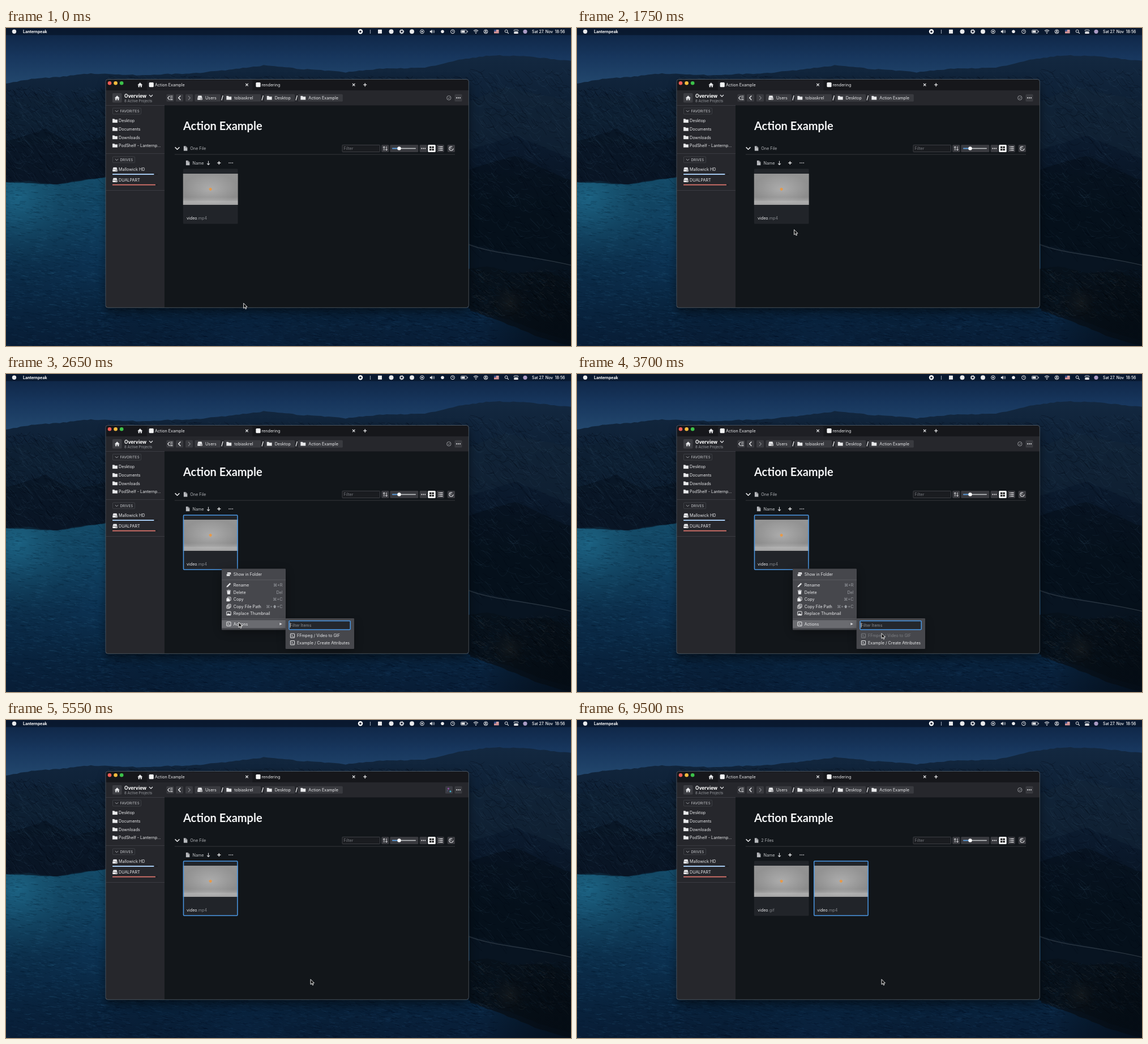
An HTML page with a canvas for the animation above (9550 ms loop, 998 px wide and 561 px high).

```html
<!DOCTYPE html>
<html lang="en">
<head>
<meta charset="utf-8">
<title>File action demo</title>
<style>
html, body { margin: 0; width: 100%; height: 100%; overflow: hidden; background: #0a1a30; }
canvas, svg { position: absolute; left: 0; top: 0; width: 998px; height: 561px; }
text { font-family: Inter, "DejaVu Sans", sans-serif; white-space: pre; }
</style>
</head>
<body>
<canvas id="wall" width="998" height="561"></canvas>
<svg id="ui" viewBox="0 0 998 561"></svg>
<script>
const LOOP = 9550;

// ---------- wallpaper ----------
const g = document.getElementById('wall').getContext('2d');
let seed = 7;
const rnd = () => (seed = seed * 16807 % 2147483647) / 2147483647;

function ramp(y0, y1, ...colors) {
  const grad = g.createLinearGradient(0, y0, 0, y1);
  colors.forEach((c, i) => grad.addColorStop(i / (colors.length - 1), c));
  return grad;
}
function land(points, fill) {
  g.beginPath();
  points.forEach(([x, y], i) => {
    if (!i) return g.moveTo(x, y);
    const [px, py] = points[i - 1];
    const n = Math.max(1, Math.abs(x - px) / 6 | 0);
    for (let k = 1; k <= n; k++)
      g.lineTo(px + (x - px) * k / n, py + (y - py) * k / n + (rnd() - .5) * 1.6);
  });
  g.fillStyle = fill;
  g.fill();
}
// short random strokes inside a box
function grain(n, x, y, w, h, len, slope, colors, width = 1) {
  g.lineWidth = width;
  for (let i = 0; i < n; i++) {
    const a = x + rnd() * w, b = y + rnd() * h, l = len * (.4 + rnd());
    g.strokeStyle = colors[i % colors.length];
    g.beginPath();
    g.moveTo(a, b);
    g.quadraticCurveTo(a + l / 2, b + slope * l * rnd(), a + l, b + slope * l * (rnd() * 1.4 - .2));
    g.stroke();
  }
}
function glow(x, y, r, color) {
  const grad = g.createRadialGradient(x, y, 0, x, y, r);
  grad.addColorStop(0, color);
  grad.addColorStop(1, 'transparent');
  g.fillStyle = grad;
  g.fillRect(x - r, y - r, 2 * r, 2 * r);
}
function paintWall() {
  g.fillStyle = ramp(0, 100, '#0d2342', '#17365d', '#23486e');
  g.fillRect(0, 0, 998, 110);
  g.fillStyle = ramp(262, 561, '#155070', '#114567', '#0c3252', '#092540', '#081d36');
  g.fillRect(0, 250, 998, 311);
  glow(20, 300, 170, 'rgba(38,126,158,.45)');
  grain(1500, -10, 275, 190, 286, 9, .25, ['rgba(70,150,185,.10)', 'rgba(2,18,40,.22)']);
  grain(1500, 160, 490, 700, 71, 9, .3, ['rgba(50,105,150,.13)', 'rgba(1,10,26,.28)']);

  const shore = [[998, 561], [940, 545], [880, 520], [820, 498], [817, 265],
    [176, 263], [130, 268], [90, 276], [40, 270], [0, 272]];
  land([[0, 98], [45, 90], [95, 86], [150, 80], [230, 83], [330, 80], [400, 73], [455, 66],
    [520, 72], [600, 78], [660, 72], [740, 70], [800, 56], [860, 48], [920, 50], [998, 58], ...shore],
    ramp(50, 330, '#132840', '#0d1f34', '#0a182a', '#081421'));
  land([[0, 130], [60, 116], [110, 128], [176, 108], [176, 263], [90, 276], [0, 272]], 'rgba(14,32,50,.6)');
  land([[0, 200], [70, 178], [120, 205], [176, 190], [176, 263], [90, 276], [0, 272]], 'rgba(5,15,27,.45)');
  land([[817, 130], [880, 105], [998, 128], [998, 230], [900, 190], [817, 215]], 'rgba(21,38,56,.5)');
  land([[817, 250], [900, 225], [998, 270], [998, 420], [817, 380]], 'rgba(4,12,22,.45)');
  const rock = ['rgba(80,115,145,.10)', 'rgba(1,7,15,.28)'];
  grain(650, -10, 104, 185, 155, 14, 1.3, rock);
  grain(650, 815, 70, 190, 320, 16, 1.2, rock);
  grain(250, 176, 84, 640, 12, 10, .8, rock);

  // road, cliffs and dark bay
  g.strokeStyle = '#27333f';
  g.lineWidth = 1.6;
  g.beginPath();
  g.moveTo(815, 381);
  g.bezierCurveTo(860, 399, 920, 400, 1000, 419);
  g.stroke();
  land([[817, 425], [850, 420], [900, 432], [960, 430], [998, 445], [998, 552], [940, 535], [890, 515], [817, 495]], '#07111b');
  grain(500, 820, 425, 180, 85, 9, 1, ['rgba(120,125,125,.13)', 'rgba(0,4,9,.4)', 'rgba(30,70,100,.16)']);
  glow(890, 485, 40, 'rgba(70,62,50,.22)');
  glow(998, 561, 160, 'rgba(3,10,18,.65)');
  glow(420, 561, 260, 'rgba(12,45,80,.25)');
  g.fillStyle = 'rgba(8,20,40,.72)';
  g.fillRect(0, 0, 998, 12.5);
}
paintWall();

// ---------- SVG helpers ----------
const BTN = '#393a3f', INK = '#e9eaec', DIM = '#9b9ea3', BLUE = '#4a97e3';
const R = (x, y, w, h, fill, r = 0, more = '') =>
  `<rect x="${x}" y="${y}" width="${w}" height="${h}" rx="${r}" fill="${fill}" ${more}/>`;
const C = (x, y, r, fill, more = '') => `<circle cx="${x}" cy="${y}" r="${r}" fill="${fill}" ${more}/>`;
const P = (d, stroke = INK, w = 1.2, fill = 'none') =>
  `<path d="${d}" fill="${fill}" stroke="${stroke}" stroke-width="${w}" stroke-linejoin="round"/>`;
const T = (x, y, s, size = 7.2, fill = INK, weight = 400, more = '') =>
  `<text x="${x}" y="${y}" font-size="${size}" fill="${fill}" font-weight="${weight}" ${more}>${s}</text>`;
const U = (id, x, y) => `<use href="#${id}" x="${x}" y="${y}"/>`;
const G = (id, body, more = '') => `<g id="${id}" ${more}>${body}</g>`;
const box = (x, y, w, h) => R(x, y, w, h, 'none', 1, 'stroke="#45474c" stroke-width=".8"');
const dots = (x, y, c = INK) => [-3, 0, 3].map(d => C(x + d, y, 1, c)).join('');

// icons are centred on 0,0
const defs = `<defs>
  <linearGradient id="backdrop" x2="0" y2="1">
    <stop offset="0" stop-color="#a3a3a3"/><stop offset=".75" stop-color="#999"/>
    <stop offset=".84" stop-color="#aaa"/><stop offset=".9" stop-color="#c2c2c2"/><stop offset="1" stop-color="#b4b4b4"/>
  </linearGradient>
  <radialGradient id="light"><stop offset="0" stop-color="#fff" stop-opacity=".16"/>
    <stop offset="1" stop-color="#444" stop-opacity=".16"/></radialGradient>
  <filter id="soft" x="-20%" y="-20%" width="140%" height="150%"><feGaussianBlur stdDeviation="9"/></filter>
  ${G('folder', P('M-4.3-3.2h3.2l1 1.2h4.4v5.2h-8.6z', INK, .3, INK))}
  ${G('drive', P('M-2.8-3.6h5.6l1.2 3.4h-8z', INK, .3, INK) + R(-4.3, .4, 8.6, 3.2, INK, .8) + R(1.2, 1.6, 2, .9, '#333'))}
  ${G('doc', P('M-3-4h3.6l2.6 2.6v5.4h-6.2z', '#b9bbbf', .3, '#b9bbbf') + P('M.5-4v2.7h2.7', '#4a4c50', .6))}
  ${G('home', P('M-4.2.3L0-3.8 4.2.3H3V4H1V1.2h-2V4h-2V.3z', INK, .3, INK))}
  ${G('down', P('M-3-1.4L0 1.6 3-1.4', INK, 1.2))}
  ${G('small', P('M-2.6-1.2L0 1.4 2.6-1.2', '#b5b7bb', .9))}
  ${G('cross', P('M-2.2-2.2L2.2 2.2M2.2-2.2L-2.2 2.2', INK, 1.1))}
  ${G('plus', P('M-3 0h6M0-3v6', INK, 1.3))}
  ${G('run', R(-3.6, -3.6, 7.2, 7.2, 'none', .4, 'stroke="currentColor" stroke-width="1"') + P('M-1.8-1.6L.2 0-1.8 1.6M.6 1.8h1.6', 'currentColor', .9))}
</defs>`;

function menuBar() {
  const ring = x => C(x, 6.3, 3.4, 'none', `stroke="${INK}" stroke-width="1"`);
  return C(14.5, 6.3, 3.7, INK) + T(30, 8.9, 'Lanternpeak', 6.9, '#fff', 700) +
    C(626, 6.3, 4.2, '#fff') + R(624.4, 4.7, 3.2, 3.2, '#14243c', .5) +
    P('M643.5 3v7', '#8d98a8', 1.2) + R(657, 2.8, 7, 7, INK, .5) + C(680.5, 6.3, 4, INK) +
    C(699, 6.3, 2.6, 'none', `stroke="${INK}" stroke-width="1.6"`) +
    C(699, 6.3, 3.8, 'none', `stroke="${INK}" stroke-width="1" stroke-dasharray="1.5 1.5"`) +
    C(717, 6.3, 4, INK) + ring(735) + C(735, 6.3, 1.4, INK) +
    P('M749 5h1.6l2-1.8v6.2l-2-1.8H749z', INK, .4, INK) + P('M754 4.6q1.4 1.7 0 3.4M755.6 3.4q2.4 2.9 0 5.8', INK, .8) +
    C(771, 6.3, 2.8, INK) + ring(789) + P('M789 4.2v2.3h1.7', INK, .8) +
    R(803.5, 3.6, 10.5, 5.4, 'none', 1.2, `stroke="${INK}" stroke-width=".8"`) + R(804.5, 4.6, 6, 3.4, INK) + R(814.8, 5.2, 1, 2.2, INK) +
    P('M826 5q4-3.2 8 0M827.6 6.8q2.4-2 4.8 0', INK, 1.1) + C(830, 8.7, 1, INK) +
    ring(847.5) + C(847.5, 5.3, 1.2, INK) + P('M845.5 8.4q2-2.2 4 0', INK, 1.1) +
    R(862, 3, 8.5, 6.4, '#e4dcdc') + [4.2, 6.2, 8.2].map(y => R(862, y, 8.5, .9, '#c4484c')).join('') + R(862, 3, 3.8, 3.2, '#3c548e') +
    C(883.6, 5.6, 2.4, 'none', `stroke="${INK}" stroke-width="1"`) + P('M885.4 7.4l2.4 2.4') +
    R(897.2, 3, 7.6, 2.8, 'none', 1.4, `stroke="${INK}" stroke-width=".9"`) + R(897, 6.8, 8, 3.2, INK, 1.6) +
    C(917, 6.3, 3.6, '#a99bc4') + T(929, 8.9, 'Sat 27. Nov  18:56', 6.9, '#fff', 500);
}

function sidebar() {
  const place = (y, name) => U('folder', 192.5, y) + T(199, y + 2.7, name);
  const drive = (y, name, w, color) => U('drive', 192.5, y) + T(199, y + 2.7, name) +
    R(188, y + 7.5, 80, 1.8, '#1d1e22') + R(188, y + 7.5, w, 1.8, color, .6);
  const head = (y, w, name) => box(188.5, y - 5.3, w, 10.6) + U('small', 195.5, y) +
    T(201.5, y + 2.3, name, 6.1, '#b5b7bb', 500, 'letter-spacing=".15"');
  const rule = y => R(176.5, y, 103.5, 1, '#3a3b41');
  return R(176.5, 110, 103.5, 383, '#26272c') + R(188, 115, 16.5, 16.5, '#3d3e43', 1.5) + U('home', 196.3, 123.3) +
    T(209, 122.6, 'Overview', 8.4, '#fff', 700) + U('down', 256, 119.4) +
    T(209, 130.9, '8 Active Projects', 6.2, DIM) + rule(136) +
    head(146.6, 50, 'FAVORITES') + place(163.7, 'Desktop') + place(178.3, 'Documents') +
    place(192.9, 'Downloads') + place(207.4, 'PodShelf - Lanternp...') + rule(221) +
    head(232.3, 39, 'DRIVES') + drive(249.6, 'Mallowick HD', 73.5, '#a5c9ef') +
    drive(268.3, 'DUALPART', 76, '#df7770') + rule(286);
}

function toolbar() {
  const crumb = (x, w, icon, name) => R(x, 116.8, w, 13, BTN, 1.5) + U(icon, x + 9, 123.2) + T(x + 18.5, 125.9, name);
  const slash = x => P(`M${x} 127.5l2.4-8.5`, INK, 1.3);
  const key = (x, color = BTN) => R(x, 116.8, 13, 13, color, 1.5);
  return R(280, 110, 537, 26.5, '#26272c') + key(283.5) + key(300) + key(317) +
    P('M289 119.8l-3.4 3.5 3.4 3.5M290 120.2h4.5M290 123.3h4.5M290 126.4h4.5', INK, 1.1) +
    P('M308.3 119.6l-3.6 3.7 3.6 3.7', INK, 1.4) + P('M322 119.8l3.4 3.5-3.4 3.5', '#85878b', 1.1) +
    crumb(333.5, 45.5, 'drive', 'Users') + slash(380.8) + crumb(384.8, 65.4, 'folder', 'tobiaskrel') + slash(452) +
    crumb(456.2, 54, 'folder', 'Desktop') + slash(512) + crumb(515.8, 79, 'folder', 'Action Example') +
    key(792.5) + dots(799, 123.3);
}

function tabs() {
  return R(176.5, 91, 640.5, 20, '#16171b', 4) + R(249, 92, 186.5, 18.5, '#1e1f24', 2) +
    C(183, 97.2, 3.3, '#f25d57') + C(193.6, 97.2, 3.3, '#f4bb3d') + C(204.2, 97.2, 3.3, '#3cc24a') +
    U('home', 236.8, 100.2) + R(252.6, 96, 8.2, 8.2, '#f3f4f5', 1.5) + T(263, 102.9, 'Action Example') +
    U('cross', 425.5, 100.2) + R(441.4, 96, 8.2, 8.2, '#f3f4f5', 1.5) + T(451.5, 102.9, 'rendering') +
    U('cross', 614.2, 100.2) + U('plus', 634.2, 100.2);
}

function content() {
  const key = (x, w = 13.2, color = BTN) => R(x, 206, w, 13, color, 1.5);
  const cells = [0, 1, 2, 3].map(i => R(748 + i % 2 * 4.4, 208.8 + (i >> 1) * 4.2, 3.4, 3.2, '#222')).join('');
  const lines = [209.5, 212.5, 215.5].map(y => R(764, y - .6, 1.4, 1.4, INK) + R(766.2, y - .6, 5.4, 1.3, INK)).join('');
  return T(313, 180.2, 'Action Example', 20, '#f4f5f6', 700, 'style="font-family:Lato,sans-serif"') +
    P('M298.6 210.4l3.9 3.9 3.9-3.9', INK, 1.5) + U('doc', 317, 212.4) +
    `<text id="count" x="325.3" y="215.1" font-size="7.2" fill="#b4b6ba"></text>` +
    R(594, 206.4, 66.5, 12.2, '#1a1c20', 1, 'stroke="#494b50" stroke-width=".8"') + T(596.5, 215.1, 'Filter', 7.2, '#75787d') +
    key(663.2) + P('M667.8 216v-7l-1.8 2M667.8 209l1.6 2M672 209v7l-1.8-2M672 216l1.6-2', INK, .9) +
    key(678.3, 50) + R(682, 211.7, 42, 1.5, '#c4c6c9', .7) + R(682, 211.7, 12, 1.5, BLUE, .7) + C(694.5, 212.4, 3.2, '#fff') +
    key(730.6) + dots(737.2, 212.4) + key(745.2, 13.6, '#f1f2f3') + cells + key(760.6) + lines +
    key(779.8) + C(786.4, 212.5, 3.5, 'none', `stroke="${INK}" stroke-width="1.1" stroke-dasharray="18 4"`) + P('M786.4 212.8l-1.6-2', INK, 1.1) +
    R(298, 222.5, 495, 1, '#34373b') +
    U('doc', 321, 238) + T(329.5, 240.7, 'Name', 7.2, '#c6c8cb') + P('M357.5 234.4v6.6M355.2 239l2.3 2.4 2.3-2.4', '#d5d7da', 1.1) +
    U('plus', 376.3, 238) + dots(397.2, 238, '#a6a8ac');
}

function card(id, ext) {
  return G(id, R(0, 248.5, 96.8, 97, '#212429', 1.5) +
    R(0, 248.5, 96.8, 97, '#454b51', 1.5, 'class="hover" opacity="0"') +
    R(0, 257, 96.8, 55, 'url(#backdrop)') + R(0, 257, 96.8, 55, 'url(#light)') +
    P('M45.6 283.8l2.7-2 2.5 1.6-.6 2.6-2.5.9z', '#e6994a', .4, '#e89a48') +
    T(6.2, 338, `video<tspan fill="#85888d">.${ext}</tspan>`) +
    R(.7, 249.1, 95.4, 95.9, 'none', 1.2, `class="frame" stroke="${BLUE}" stroke-width="1.5" opacity="0"`));
}

const rows = [['Show in Folder', '', 353.5], ['Rename', '⌘+R', 372.3], ['Delete', 'Del', 384.8], ['Copy', '⌘+C', 397.3],
  ['Copy File Path', '⌘+⬆+C', 409.8], ['Replace Thumbnail', '', 422.3], ['Actions', '▸', 441]];

function menu() {
  const stroke = `stroke="${INK}" stroke-width="1"`;
  const icons = [
    R(-2.6, -3.4, 6.4, 4, INK, .6) + R(-4, -.8, 6.4, 4, INK, .6, 'stroke="#46474c" stroke-width=".6"'),
    P('M-3.8 3.8l.6-2.2L2-3.6 3.6-2-1.6 3.2z', INK, .3, INK),
    P('M-2.8-1.8h5.6l-.5 5.6h-4.6z', INK, .3, INK) + P('M-3.6-2.8h7.2M-1-3.6h2', INK, 1),
    R(-2, -3.6, 5.6, 5.8, 'none', .5, stroke) + R(-4, -1.8, 5.8, 5.8, INK, .5),
    R(-1.6, -3.6, 5.2, 5.6, 'none', .5, stroke) + R(-3.6, -1.6, 5.2, 5.4, 'none', .5, stroke) + P('M-2 2l2-2', INK, .9),
    R(-3.7, -3.3, 7.4, 6.6, 'none', .5, stroke) + P('M-3 2.6l2.2-3 1.6 2 1-1 1.6 2z', INK, .3, INK),
    U('run', 0, 0)];
  return G('menu', R(383, 349, 109, 104, '#000', 2, 'opacity=".45" filter="url(#soft)"') +
    R(381, 343.5, 113, 108, '#46474c', 1.2) + R(381, 434, 113, 14, '#6a6b70', 0, 'id="pick"') +
    R(381, 362.7, 113, .9, '#5d5e63') + R(381, 431.5, 113, .9, '#5d5e63') +
    rows.map(([name, key, y], i) => `<g transform="translate(393.4 ${y})">${icons[i]}</g>` + T(401.8, y + 2.7, name) +
      (key == '▸' ? P(`M483.5 ${y - 2}l4 2-4 2z`, INK, .2, INK) : T(488.5, y + 2.7, key, 7.2, DIM, 400, 'text-anchor="end"'))).join(''),
    `color="${INK}"`);
}

function submenu() {
  return G('sub', R(496, 436, 117, 50, '#000', 2, 'opacity=".4" filter="url(#soft)"') +
    R(493.7, 431, 121.3, 54, '#46474c', 1.2) +
    R(500, 435.4, 108.2, 15.6, '#24272c', 1.4, `stroke="${BLUE}" stroke-width="1.5"`) +
    T(501.8, 445.8, 'Filter Items', 7.2, '#8d9095') + R(501.6, 438.6, .7, 9, '#fff', 0, 'id="caret"') +
    G('first', U('run', 506, 461.7) + T(514, 464.4, 'FFmpeg / Video to GIF', 7.2, 'currentColor')) +
    U('run', 506, 474.2) + T(514, 476.9, 'Example / Create Attributes'), `color="${INK}"`);
}

document.getElementById('ui').innerHTML = defs + menuBar() +
  R(178, 98, 638, 402, '#000', 5, 'opacity=".55" filter="url(#soft)"') +
  R(176.5, 91, 640.5, 402, '#12161a', 4) + tabs() + sidebar() + toolbar() + content() +
  R(176, 90.5, 641.3, 402.8, 'none', 4, 'stroke="#7b8087" stroke-opacity=".6" stroke-width=".9"') +
  G('idle', C(782.3, 123.3, 3.7, 'none', 'stroke="#a0a2a6" stroke-width=".9"') + P('M780.6 123.4l1.3 1.3 2.3-2.6', '#a0a2a6', .9)) +
  G('busy', R(776, 116.8, 13, 13, '#3b3c43', 1.5) +
    G('spin', C(-1, -2.2, 1.7, '#8d4fa0') + C(-2.4, 1.4, 1, '#50507c') + C(2.6, 2.6, 1.5, '#46b3cf'))) +
  card('gif', 'gif') + card('mp4', 'mp4') + menu() + submenu() +
  G('cursor', P('M0 0v9l2.1-1.9 1.4 3.2 1.5-.7-1.4-3.1H6.4z', '#fff', .9, '#0a0a0a'));

// ---------- timeline ----------
const $ = id => document.getElementById(id);
const show = (id, on) => $(id).setAttribute('visibility', on ? 'visible' : 'hidden');
const set = (el, name, value) => el.setAttribute(name, value);
const clamp = v => Math.max(0, Math.min(1, v));
const ease = v => v * v * (3 - 2 * v);

// start, end, target, bend
const moves = [[500, 1280, 393, 400.7, -9], [1400, 1900, 381, 343.5, 0], [2030, 2200, 385, 355, 0],
  [2230, 2520, 411, 438, 3], [2980, 3280, 503, 441, 0], [3280, 3560, 538, 457.5, 4]];
function pointer(t) {
  let x = 419.7, y = 485.5;
  for (const [a, b, tx, ty, bend] of moves) {
    if (t <= a) break;
    const k = ease(clamp((t - a) / (b - a)));
    x += (tx - x) * k + bend * 4 * k * (1 - k);
    y += (ty - y) * k;
  }
  return [x, y];
}

function draw(t) {
  const [x, y] = pointer(t), done = t >= 6600, busy = t >= 3950 && t < 6700;
  set($('cursor'), 'transform', `translate(${x} ${y})`);

  set($('gif'), 'transform', 'translate(312.8 0)');
  show('gif', done);
  set($('mp4'), 'transform', `translate(${done ? 418 : 312.8} 0)`);
  $('count').textContent = done ? '2 Files' : 'One File';
  set($('mp4').querySelector('.hover'), 'opacity', clamp((t - 1850) / 100) * clamp((2400 - t) / 200) * .85);
  set($('mp4').querySelector('.frame'), 'opacity', t >= 1950 ? 1 : 0);

  const fade = clamp((3920 - t) / 120);
  show('menu', t >= 2050 && fade > 0);
  show('sub', t >= 2650 && fade > 0);
  set($('menu'), 'opacity', fade);
  set($('sub'), 'opacity', fade);
  const row = t > 2980 ? rows[6] : rows.find(r => Math.abs(r[2] - y) < 6.3);
  set($('pick'), 'opacity', t > 2240 && row ? 1 : 0);
  if (row) set($('pick'), 'y', row[2] - 6.8);
  set($('caret'), 'opacity', (t - 2650) % 1100 < 550 || t > 3600 ? 1 : 0);
  set($('first'), 'color', t >= 3600 ? '#7d7f83' : INK);

  show('idle', !busy);
  show('busy', busy);
  set($('spin'), 'transform', `translate(782.4 123.3) rotate(${(t - 5550) * .36})`);
}
function tick() {
  draw(performance.now() % LOOP);
  requestAnimationFrame(tick);
}
tick();
</script>
</body>
</html>
```
